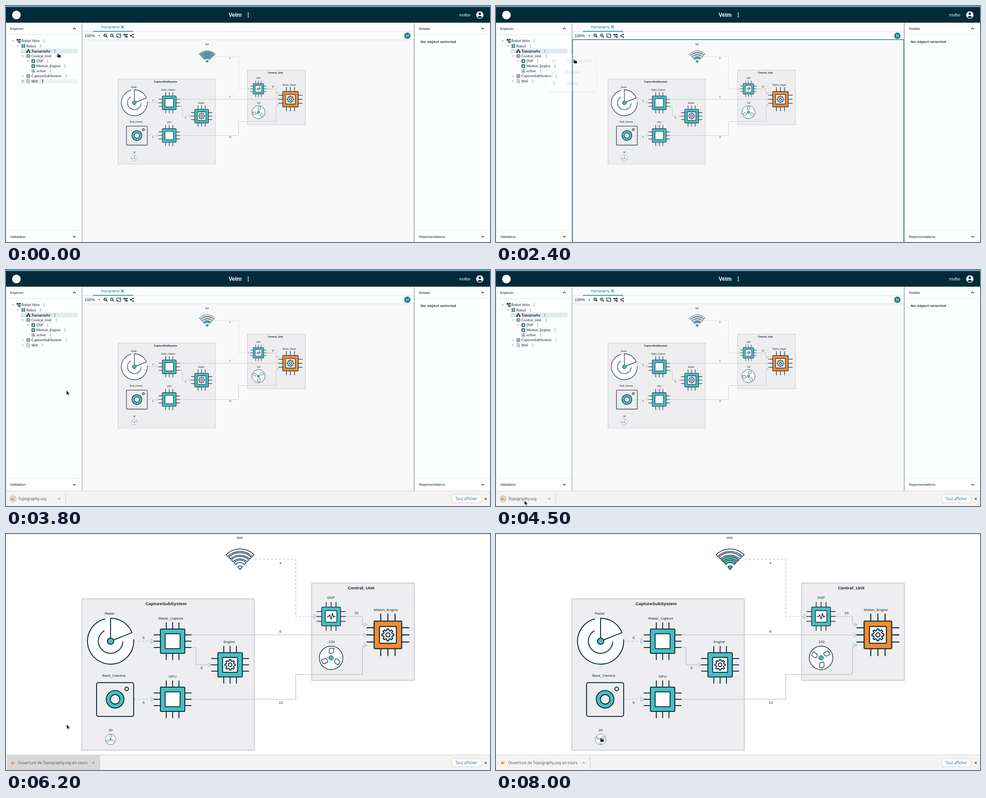
Animation, 1069 px wide and 524 px high, one loop 8.2 s. Source, as an HTML page:

```html
<!DOCTYPE html>
<html lang="en">
<head>
<meta charset="utf-8">
<title>Topography export</title>
<style>
html, body { margin: 0; height: 100%; background: #fff; }
svg { position: fixed; inset: 0; width: 100%; height: 100%; }
text { font-family: "Liberation Sans", Arial, sans-serif; fill: #15242c; white-space: pre; }
.tree { font-family: Lato, sans-serif; }
.ui { font-family: "Noto Sans", sans-serif; fill: #55585b; }
.mid { text-anchor: middle; }
.bold { font-weight: bold; }
.edge { fill: none; stroke: #b2b7ba; stroke-width: 1.2; }
.ink { stroke: #0a2c3d; stroke-width: 2; stroke-linecap: round; stroke-linejoin: round; }
.icon { fill: none; stroke: #10252f; stroke-width: 1.2; }
</style>
</head>
<body>
<svg id="stage" viewBox="0 0 1069 524"></svg>
<script>
const LOOP = 8200, OPEN = 5900, SHELF = 3360;
const NAVY = '#0a2c3d', TEAL = '#47bfc3', DEEP = '#14808a';
const $ = id => document.getElementById(id);

// Drawing helpers
const label = (x, y, s, size = 8, cls = '', extra = '') =>
  `<text x="${x}" y="${y + size * .35}" font-size="${size}" class="${cls}" ${extra}>${s}</text>`;
const rect = (x, y, w, h, fill, extra = '') =>
  `<rect x="${x}" y="${y}" width="${w}" height="${h}" fill="${fill}" ${extra}/>`;
const circle = (x, y, r, fill, extra = '') =>
  `<circle cx="${x}" cy="${y}" r="${r}" fill="${fill}" ${extra}/>`;
const path = (d, cls, extra = '') => `<path d="${d}" class="${cls}" ${extra}/>`;
const at = (x, y, body, scale = 1) => `<g transform="translate(${x} ${y}) scale(${scale})">${body}</g>`;
const polar = (r, deg) => {
  const a = deg * Math.PI / 180;
  return (r * Math.sin(a)).toFixed(2) + ' ' + (-r * Math.cos(a)).toFixed(2);
};
const dots = (x, y, fill = '#3c4a52', r = .85, gap = 3) =>
  [-gap, 0, gap].map(d => circle(x, y + d, r, fill)).join('');
const chevron = (x, y, turn, size = 1) => at(x, y,
  `<path d="M-3 1.5L0-1.5L3 1.5" transform="rotate(${turn})" class="icon"/>`, size);

// Diagram parts
const gearPoints = [...Array(8).keys()].flatMap(i =>
  [[8.7, -14], [11.8, -9], [11.8, 9], [8.7, 14]].map(([r, a]) => polar(r, i * 45 + a)));
const gear = path('M' + gearPoints.join('L') + 'Z', 'ink', 'fill="#fff"') +
  circle(0, 0, 4, '#fff', 'class="ink"');
const pulse = path('M-12 1H-7L-4-5L0 8L4-9L7 3L8 0H12', 'ink', 'fill="none"');

function chip(x, y, scale, inner = '', fill = TEAL) {
  const pins = [-14, 0, 14].map(p => `M${p}-41V41M-41 ${p}H41`).join('');
  return at(x, y, path(pins, 'ink') +
    rect(-27, -27, 54, 54, fill, 'rx="2" class="ink"') +
    rect(-16.5, -16.5, 33, 33, '#fff', 'rx="1" class="ink"') + inner, scale);
}

function fan(x, y, scale) {
  const blade = a => `<path d="M-5-10Q-6-18-4-21Q0-22.500 5-21L4-12Q1-9-5-10Z" fill="#fff"
    stroke="${NAVY}" stroke-width="1.300" transform="rotate(${a})"/>`;
  return at(x, y, circle(0, 0, 26, '#fff', `stroke="${NAVY}" stroke-width="1.4"`) +
    `<g class="spin">${[0, 120, 240].map(blade).join('')}</g>` +
    circle(0, 0, 5, TEAL, `stroke="${NAVY}"`), scale);
}

const band = (r, w) => `M${polar(r, -45)}A${r} ${r} 0 0 1 ${polar(r, 45)}L${polar(r - w, 45)}` +
  `A${r - w} ${r - w} 0 0 0 ${polar(r - w, -45)}Z`;
const wifi = at(517, 77, ['M-5-4Q0-9 5-4L0 2Z', band(19, 5.5), band(27.3, 5.5), band(35.6, 5.5), band(43.8, 5.5)]
  .map(d => `<path d="${d}" fill="#fff"/><path d="${d}" fill="${TEAL}" class="signal"/>` +
    path(d, 'ink', 'fill="none" style="stroke-width:1.5"')).join(''));

const radar = at(231, 238, circle(0, 0, 50, '#fff') +
  path(`M${polar(51, -15)}A51 51 0 1 0 ${polar(51, 86)}M0 0V-51A51 51 0 0 1 ${polar(51, 68)}Z` +
    `M${polar(27, -32)}A27 27 0 1 0 ${polar(27, 94)}`, 'ink', 'fill="none"') +
  circle(0, 0, 7, TEAL, 'class="ink"'));

const camera = rect(200, 330, 82, 75, 'none', 'rx="4" class="ink"') +
  circle(241, 367, 19.5, TEAL, 'class="ink"') + circle(241, 367, 10.5, '#eee', 'class="ink"') +
  circle(266.5, 344, 4, 'none', 'class="ink"');

const box = (x, y, w, h) => rect(x, y, w, h, '#eeedef', 'stroke="#b0b8bb" stroke-width="1.2"');
const open = (x, y) => `M${x - 8} ${y - 5}L${x} ${y}L${x - 8} ${y + 5}`;
const closed = (x, y) => `M${x - 7} ${y - 5}L${x} ${y}L${x - 7} ${y + 5}Z`;

const diagram = box(167.5, 144, 381, 336) + box(675, 109, 227, 216) +
  path('M549 56H640V183H680M282 238H320M282 367H320', 'edge', 'stroke-dasharray="5 4"') +
  path('M409 224H797M409 251.5H419.500V290.500H454M409 367H640V312H787.500V247H797M749 183H787V201H797', 'edge') +
  path([[797, 224], [797, 201], [797, 247], [454, 290.5]].map(p => open(...p)).join('') +
    [[687, 183], [327, 238], [327, 367]].map(p => closed(...p)).join(''), 'edge') +
  wifi + radar + camera +
  chip(368, 238, 1) + chip(368, 367, 1) + chip(495, 290.5, 1, gear) +
  chip(843.5, 224, 1.13, gear, '#f78b2d') + chip(718, 183, .77, pulse) +
  fan(718, 275, 1) + fan(231, 456, .45) +
  label(353.5, 155, 'CaptureSubSystem', 9.9, 'mid bold') +
  label(784.5, 119.5, 'Central_Unit', 9.9, 'mid bold') +
  [[516, 8, 'Wifi'], [229, 176.5, 'Radar'], [364, 187, 'Radar_Capture'], [238, 314, 'Back_Camera'],
   [368, 316, 'GPU'], [493, 239, 'Engine'], [719, 239, '100'], [231, 435, '20'], [718, 141.5, 'DSP'],
   [839, 168, 'Motion_Engine'], [606, 64, '4'], [304, 230, '6'], [304, 374.5, '6'], [432, 297, '6'],
   [606, 216.5, '6'], [607, 374.5, '10'], [774, 175, '10']]
    .map(([x, y, s]) => label(x, y, s, 8, 'mid')).join('');

// Explorer tree
const icons = {
  tree: '<path d="M-4-4h3v3h-3zM1-4h4v3h-4zM1 1h4v3h-4z" fill="#10252f"/><path d="M-2.500-2.500H1M-.500-2.500V2.500H1" class="icon"/>',
  grid: [[-4, -4], [.5, -4], [-4, .5], [.5, .5]].map(([x, y]) => rect(x, y, 3.5, 3.5, '#2b6f7c')).join(''),
  map: '<path d="M-1.500-4h3v3h-3zM-4.500 1h3v3h-3zM1.500 1h3v3h-3z" fill="#10252f"/><path d="M0-2V0M-3 2V0H3V2" class="icon"/>',
  chip: '<path d="M-1.500-4.500V4.500M1.500-4.500V4.500M-4.500-1.500H4.500M-4.500 1.500H4.500" stroke="#2c5563" stroke-width=".8"/>' +
    rect(-3, -3, 6, 6, '#fff', 'stroke="#2c5563"') + rect(-1.2, -1.2, 2.4, 2.4, '#2c5563'),
  part: '<path d="M-1.500-4.500V4.500M1.500-4.500V4.500M-4.500-1.500H4.500M-4.500 1.500H4.500" stroke="#0a2c3d" stroke-width=".8"/>' +
    rect(-3, -3, 6, 6, TEAL, `stroke="${NAVY}"`) + rect(-1.3, -1.3, 2.6, 2.6, '#fff'),
  fan: circle(0, 0, 4, '#fff', 'stroke="#3c5560" stroke-width=".7"') +
    '<path d="M0 0V-3M0 0L-2.600 1.700M0 0L2.600 1.700" stroke="#3c5560" stroke-width="1.300"/>',
  page: '<path d="M-3-4H1L3-2V4H-3ZM-1.500-1H1.500M-1.500 1H1.500" fill="none" stroke="#5f6f78" stroke-width=".8"/>'
};
const rows = [['Robot Velm', 15, 'tree', 84, 180], ['Robot', 26, 'grid', 76, 180], ['Topography', 37, 'map', 108],
  ['Central_Unit', 37, 'chip', 111, 180], ['DSP', 48, 'part', 92, 90], ['Motion_Engine', 48, 'part', 130],
  ['active', 48, 'fan', 98], ['CaptureSubSystem', 37, 'chip', 133, 90], ['Wifi', 37, 'page', 81, 90]];
const tree = rows.map(([name, x, icon, menu, turn], i) => {
  const y = 77.6 + i * 11.15;
  return (turn ? chevron(x, y, turn, .6) : '') + at(x + 12.3, y, icons[icon]) +
    label(x + 19, y, name, 8.05, 'tree' + (i == 2 ? ' bold' : '')) + dots(menu, y, '#3c4a52', .75, 2.6);
}).join('');

const lens = (x, sign) => circle(x - 1, 65, 2.9, 'none', 'stroke="#10252f" stroke-width="1.2"') +
  path(`M${x + 1.2} 67.200L${x + 4} 70`, 'icon', 'style="stroke-width:1.600"') +
  path(`M${x - 2.5} 65h3` + (sign ? `M${x - 1} 63.500v3` : ''), 'icon', 'style="stroke-width:.8"');

const app = rect(0, 0, 1069, 524, '#fdfefe') + rect(169, 75, 732, 449, '#f9f9fa') +
  rect(0, 0, 1069, 37, '#022b3a') + rect(0, 0, 1069, 1, '#dce6e8') + rect(0, 1, 1069, 1.6, '#24808a') +
  circle(23, 20, 9.5, '#fff') + label(506, 20, 'Velm', 12.3, 'mid bold', 'style="fill:#fff"') +
  dots(535, 20, '#fff', 1.3, 4) + label(1001, 20, 'mulbo', 9, '', 'style="fill:#fff"') +
  circle(1046.5, 20, 8, '#fff') + circle(1046.5, 17.3, 2.7, '#022b3a') +
  '<path d="M1041 24.500Q1046.500 19.500 1052 24.500Q1046.500 29 1041 24.500Z" fill="#022b3a"/>' +
  rect(0, 63, 167, 1, '#e2e5e7') + rect(903, 63, 166, 1, '#e2e5e7') +
  label(9, 50, 'Explorer') + chevron(151, 50, 0) + label(912, 50, 'Details') + chevron(1053, 50, 0) +
  label(916, 79.5, 'No object selected', 8, 'bold', 'letter-spacing=".43"') +
  rect(169, 56.5, 732, 1, '#d9dcde') + rect(192, 55.5, 89, 1.5, DEEP) + rect(169, 74.5, 732, 1, '#d3d7d9') +
  label(209, 46.5, 'Topography', 8.05, '', 'style="fill:#16789a"') +
  path('M254.500 43.500l6 6m0-6l-6 6', 'icon', 'style="stroke:#16789a"') +
  label(173.5, 66, '100%', 9) + '<path d="M203.500 65h5l-2.500 2.700z" fill="#4d5a61"/>' +
  lens(220, true) + lens(234.5, false) +
  rect(244.5, 62, 9, 7.5, 'none', 'rx=".8" class="icon"') +
  path('M246.500 66V67.700H248.500M249.500 63.800H251.500V65.500', 'icon', 'style="stroke-width:.9"') +
  at(263.5, 66, icons.tree) + path('M281 63L275.500 66L281 69', 'icon') +
  [[281, 63], [275.5, 66], [281, 69]].map(([x, y]) => circle(x, y, 1.6, '#10252f')).join('') +
  circle(886.5, 66, 7, DEEP) + label(886.5, 66, 'M', 8.5, 'mid', 'style="fill:#fff"') +
  rect(32, 94.6, 126, 10.8, '#e1ebee') + `<g id="hover">${rect(32, 161.5, 126, 10.8, '#edf4f6')}</g>` + tree +
  `<g id="hoverInk">${chevron(37, 166.8, 90, .7)}${dots(81, 166.8, '#000', 1, 2.6)}</g>` +
  '<g id="footers">' + rect(0, 498, 167, 40, '#fdfefe') + rect(903, 498, 166, 40, '#fdfefe') +
  rect(0, 498, 167, 1, '#dfe3e5') + rect(903, 498, 166, 1, '#dfe3e5') +
  label(9, 512, 'Validation') + chevron(151, 512, 180) +
  label(912, 512, 'Representations') + chevron(1053, 512, 180) + '</g>' +
  rect(0, 37, 1, 487, '#dde3e6') + rect(167, 37, 2, 487, '#b6c2c8') + rect(900.5, 37, 2.5, 487, '#b6c2c8') +
  `<rect id="focus" x="169" y="74.500" width="731.500" height="460" fill="none" stroke="${DEEP}" stroke-width="1.500"/>`;

const menu = rect(113, 106, 108, 82.5, '#fff', 'rx="2" style="filter:drop-shadow(0 2px 3px #0006)"') +
  rect(113, 134, 108, 1, '#e4e4e2') +
  [['Export to SVG', 122], ['Rename', 147], ['Delete', 171.5]].map(([s, y]) => label(153.5, y, s, 9.3, 'tree')).join('') +
  rect(123.5, 118, 9, 8, '#737373', 'rx="1"') + '<path d="M124.500 125l2.500-3.200l1.700 2l2-2.700l2 3.900z" fill="#fff"/>' +
  '<path d="M124 151v-2l6-6l2 2l-6 6z" fill="#737373"/>' +
  '<path d="M124.500 168h7v1h-7zM126.500 167h3v1h-3zM125 169.500h6v7h-6z" fill="#737373"/>';

const shelf = '<g id="bar">' + rect(0, 490, 1069, 40, '#f4f3f1') + rect(0, 490, 1069, 1, '#d2d1cf') + '</g>' +
  '<g id="slip">' + rect(984.5, 498.5, 65, 18.5, '#fbfbfa', 'id="button" rx="2" stroke="#cfd3d7"') +
  label(1016.7, 508, 'Tout afficher', 8.05, 'ui mid', 'style="fill:#2f74c0"') +
  path('M1057.300 505.800l4.600 4.600m0-4.600l-4.600 4.600', 'icon', 'style="stroke:#44474a"') + '</g>' +
  path('M8.500 524Q9 517 14 516M10 524l3-3', 'icon', 'id="sliver"') +
  '<g id="item">' + rect(2, 491, 130, 33, '#d9d8d7', 'id="itemHover"') +
  circle(64, 512, 10, '#bdbcbb', 'id="ripple"') +
  circle(15.5, 508, 6.7, '#dde3e8', 'id="ring" stroke="#aeb7bf" stroke-width="1.2"') +
  at(15.5, 508, rect(-4, -3, 7, 6, '#e9a53f') + rect(-2.5, -3.8, 6, 5, '#f2c478') + rect(-3, 0, 3, 2.4, '#e0743c')) +
  '<text id="file" x="27" y="511" font-size="8.400" class="ui"></text>' +
  `<g id="itemEnd">${chevron(118, 508, 0, .8)}${rect(131.5, 494, 1, 28, '#cfcecc')}</g></g>`;

const status = '<g id="status">' + rect(-2, 475, 358, 15, '#f1f1f0', 'rx="2" stroke="#dddddc" stroke-width=".6"') +
  label(2.5, 482.5, 'staging.obeostudio.com/api/editingcontexts/.../70c7060b-cd23-4aac-99b2-1a3ef3797a34', 7.95, 'ui') +
  '</g><g id="arrow" fill="#a9cde0">' +
  '<path d="M18 444h4v5h4l-6 6l-6-6h4zM12 461h16v1.500h-16z"/></g>';

const cursor = '<g id="cursor"><path id="pointer" d="M0 0V10L2.500 7.800L4.300 11.500L6 10.700L4.300 7.200H7.500Z" ' +
  'fill="#111" stroke="#fff" stroke-width=".6"/><path id="hand" d="M-4-4.500Q-3-5.500-2-4L0-1.500H2.500Q4-1 4 1V4.500H-2' +
  'L-4 2.500V0L-2.500-.500Z" fill="#111" stroke="#fff" stroke-width=".5"/></g>';

$('stage').innerHTML = `<g id="app">${app}</g>${rect(0, 0, 1069, 1, '#dcdcdc')}<g id="diagram">${diagram}</g>` +
  `<g id="menu">${menu}</g>${status}${shelf}${cursor}`;

// Motion
const clamp = v => Math.max(0, Math.min(1, v));
const ramp = (t, a, b) => clamp((t - a) / (b - a));
const between = (t, a, b) => t >= a && t < b;
const show = (id, on) => $(id).style.display = on ? '' : 'none';
const fade = (id, v) => $(id).style.opacity = v;
const move = (id, x, y) => $(id).setAttribute('transform', `translate(${x} ${y})`);

const stops = [[0, 117, 110], [200, 117, 110], [800, 109, 99], [1400, 109, 99], [2000, 175, 123], [3450, 175, 123],
  [4300, 63, 512], [5750, 63, 512], [6200, 134, 423], [6900, 134, 423], [7800, 234, 457], [LOOP, 234, 457]];
function cursorAt(t) {
  const i = stops.findIndex(s => s[0] > t), [t0, x0, y0] = stops[i - 1], [t1, x1, y1] = stops[i];
  const k = ramp(t, t0, t1), e = k * k * (3 - 2 * k);
  return [x0 + (x1 - x0) * e, y0 + (y1 - y0) * e];
}
const spinners = document.querySelectorAll('.spin'), signals = document.querySelectorAll('.signal');

function draw(t) {
  const opened = t >= OPEN, settled = t >= SHELF;
  const top = 524 - 34 * ramp(t, 3020, SHELF);

  show('app', !opened);
  $('diagram').setAttribute('transform', opened ? '' : 'translate(153.4 80.9) scale(.563)');
  const angle = opened ? 4 + 120 * (t - 6200) / 407 : 15 + 120 * t / 407;
  spinners.forEach(s => s.setAttribute('transform', `rotate(${angle % 360})`));
  const level = 5 * ((opened ? .03 + (t - 6200 + 700) / 700 : .95 + t / 700) % 1);
  signals.forEach((s, i) => s.style.opacity = clamp(level - i));

  show('hover', t < 200);
  show('hoverInk', t < 200);
  show('focus', between(t, 2400, 3400));
  move('footers', 0, settled ? -35.5 : 0);
  fade('menu', ramp(t, 1120, 1280) * (1 - ramp(t, 2300, 2420)));

  show('status', between(t, 2900, 3400));
  move('status', 0, top - 490);
  show('arrow', between(t, 3020, 3450));
  move('arrow', 0, top - 490);
  fade('arrow', .8 * (1 - ramp(t, 3250, 3450)));

  for (const id of ['bar', 'slip']) show(id, top < 524);
  move('bar', 0, top - 490);
  move('slip', 0, (top - 490) / 2);
  show('button', settled);
  show('sliver', between(t, 3150, SHELF));
  show('item', settled);
  fade('item', ramp(t, SHELF, 3500));
  fade('ring', 1 - ramp(t, 4800, 5200));
  fade('itemHover', ramp(t, 4550, 4700) * (1 - ramp(t, 6300, 6600)));
  $('itemHover').setAttribute('width', opened ? 205 : 130);
  show('ripple', between(t, 5600, OPEN));
  $('ripple').setAttribute('r', 10 * ramp(t, 5600, 5700));
  $('file').textContent = opened ? 'Ouverture de Topography.svg en cours' : 'Topography.svg';
  move('itemEnd', opened ? 75.5 : 0, 0);

  move('cursor', ...cursorAt(t));
  const hand = t < 400 || between(t, 1600, 3600) || t >= 7700;
  show('hand', hand);
  show('pointer', !hand);
}

const start = performance.now();
function tick() {
  draw((performance.now() - start) % LOOP);
  requestAnimationFrame(tick);
}
tick();
</script>
</body>
</html>
```
